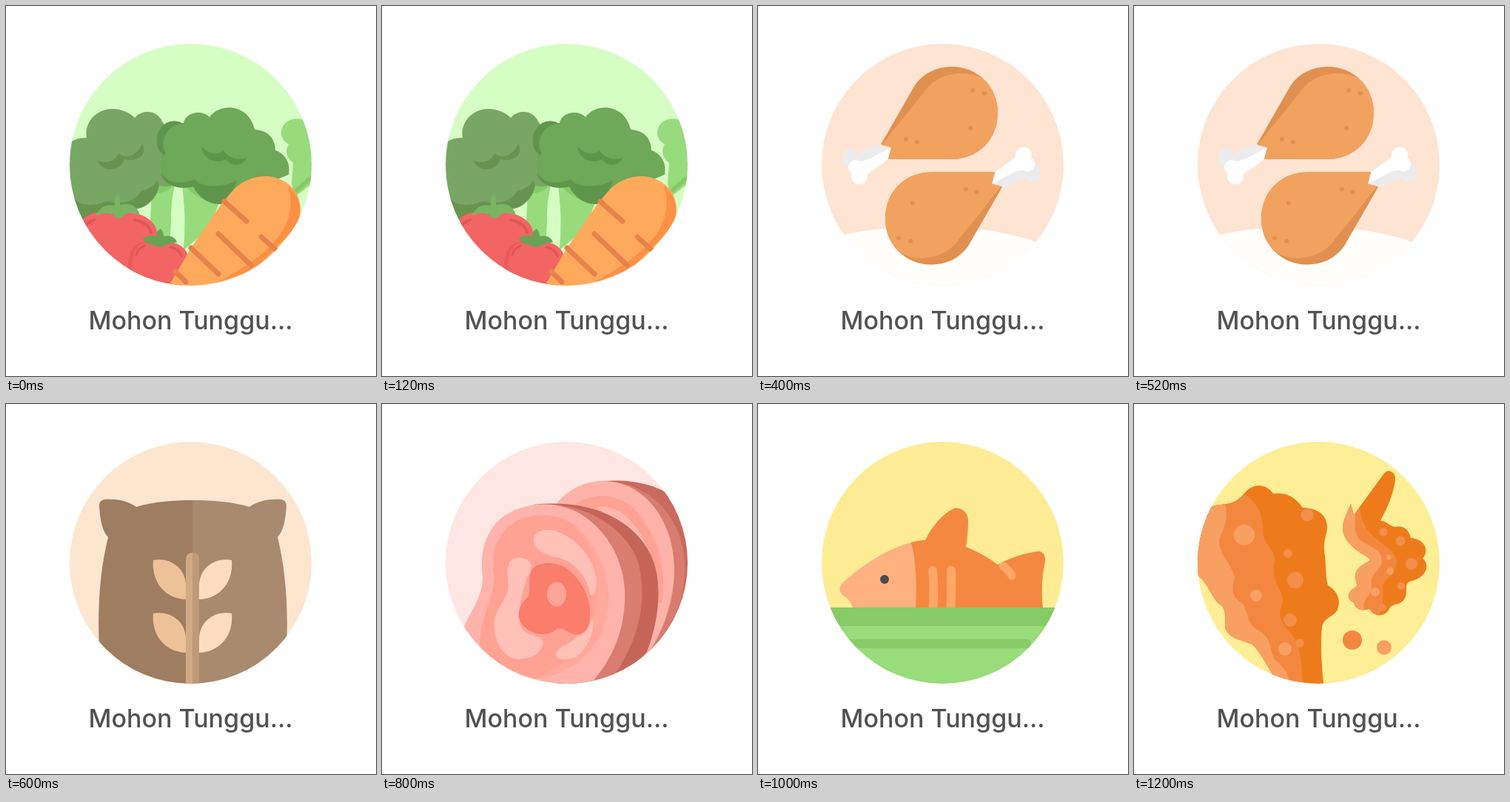
Write an HTML page that moves like this. It is 500 px wide and 500 px high and loops after 1400 ms.

```html
<!DOCTYPE html>
<html lang="id">
<head>
<meta charset="utf-8">
<title>Mohon Tunggu</title>
<style>
html, body { margin: 0; height: 100%; overflow: hidden; background: #fff; }
svg { display: block; width: 100vw; height: 100vh; }
text { font: 500 34px Inter, Roboto, sans-serif; fill: #515254; text-anchor: middle; }
.scene { display: none; }
.scene.on { display: inline; }
.line { fill: none; stroke-linecap: round; }
</style>
</head>
<body>
<svg viewBox="0 0 500 500">
<defs>
  <clipPath id="disc"><circle cx="249.5" cy="214.5" r="163.5"/></clipPath>
  <path id="leg" d="M97 150C100 137 108 137 125 135C138 133 143 127 148 122C160 106 178 107 188 121C205 120 215 123 228 140C245 141 260 147 261 165C261 180 254 185 258 205C260 225 259 235 262 245C275 253 280 265 275 278C270 288 256 288 254 302C252 325 253 350 257 385H200C185 365 175 340 160 325C145 318 128 318 123 302C123 290 125 280 118 272C105 265 100 240 86 232L80 200Z"/>
  <path id="wing" d="M293 135L297 150L337 95C342 87 352 90 353 100C352 120 341 143 333 158C341 157 345 166 354 166C366 163 372 172 374 181C390 182 401 196 390 209C401 217 395 236 372 240C365 244 370 252 367 260C361 274 352 268 346 275C341 287 326 290 318 277C309 280 299 278 297 268C288 265 287 254 299 248C304 245 299 241 299 233C299 222 309 217 318 212C321 207 304 202 298 195C283 182 277 170 287 149Z"/>
  <clipPath id="inLeg"><use href="#leg"/></clipPath>
  <clipPath id="inWing"><use href="#wing"/></clipPath>
  <g id="drum">
    <g fill="#ececec"><circle cx="124" cy="202" r="9.5"/><circle cx="123" cy="210" r="8"/><path d="M126 203L163 187L180 191L150 212L128 218Z"/></g>
    <g fill="#fff"><circle cx="132" cy="218" r="10"/><circle cx="137" cy="230" r="11"/><path d="M127 210Q142 211 152 206L180 191L176 207L148 227L132 226Z"/></g>
    <path fill="#e09050" d="M166 187L212 107C224 90 242 82 262 82C297 82 324 109 324 144C324 181 297 207 262 207H176L180 191Z"/>
    <path fill="#f2a25f" d="M167 188L224 117C235 100 255 90 280 91C297 93 308 99 312 107C320 117 324 130 324 144C324 181 297 207 262 207H176L180 191Z"/>
    <g fill="#e09050"><circle cx="290" cy="114" r="3"/><circle cx="306" cy="118" r="3"/><circle cx="287" cy="165" r="3"/><circle cx="200" cy="180" r="3"/><circle cx="215" cy="184" r="3"/></g>
  </g>
  <path id="half" d="M253 130C225 130 200 132 176 139C165 131 150 128 133 129C128 130 126 133 126 138C127 155 130 172 138 180C128 220 123 270 126 330V400H253Z"/>
  <path id="grain" d="M199 211C220 207 243 220 243 246V264C220 264 196 245 199 211Z"/>
</defs>

<g clip-path="url(#disc)">
<!-- vegetables -->
<g class="scene">
  <path fill="#d6fdc4" d="M80 45H420V385H80Z"/>
  <path fill="#98db7d" d="M420 160L402 154C385 149 371 158 372 173C373 180 377 184 382 187C376 196 380 207 388 212L386 240L390 258L420 235Z"/>
  <path class="line" stroke="#84cb68" stroke-width="6" d="M388 253L415 230"/>
  <path fill="#98db7d" d="M198 240L193 320H221C225 295 220 270 229 240ZM238 240C241 270 243 290 240 330L275 300L294 250Z"/>
  <path fill="#84cb68" d="M200 240L199 254Q218 253 228 240ZM241 240Q250 258 285 268L294 250Z"/>
  <path fill="#78a664" d="M80 190Q90 178 109 178C105 156 124 139 143 139C157 139 168 145 174 151C186 138 205 142 211 156L235 190V235C222 246 214 245 205 242C203 262 187 276 170 274C150 290 115 285 100 290L80 260Z"/>
  <path fill="#66944f" d="M86 254C103 278 128 266 137 264C157 270 178 262 182 250C192 248 202 242 205 235L207 243C203 262 187 276 170 274C150 290 115 285 100 290ZM124 209C138 214 148 209 152 199C158 205 175 207 184 186C192 201 178 211 160 207C155 224 130 226 124 209Z"/>
  <path fill="#5f954b" d="M245 162C222 146 205 162 204 180C203 192 208 197 212 200C205 225 215 245 240 245Z"/>
  <path fill="#6ea858" d="M216 199C207 185 216 160 240 158C242 146 262 138 275 150C290 130 328 132 336 167C355 168 364 180 364 195C378 200 385 213 382 228L340 245C310 272 272 275 253 244C240 248 212 242 209 220C208 210 211 203 216 199Z"/>
  <path fill="#5f954b" d="M209 226C222 243 243 240 255 234C265 246 290 246 312 236L300 266C280 272 262 262 253 244C240 248 215 246 209 226ZM264 190C276 202 289 201 294 195C301 207 316 209 326 205C318 218 304 217 297 207C285 214 266 208 264 190Z"/>
  <path fill="#f36464" d="M100 292C115 275 130 278 150 279C175 276 205 285 205 312V390H80Z"/>
  <path class="line" stroke="#dc5855" stroke-width="4" d="M174 289Q193 293 196 306M119 289Q110 292 106 300"/>
  <path fill="#78b461" d="M121 283C130 268 140 268 147 270C146 262 149 256 151 254C154 257 155 265 154 269C165 265 177 268 181 283C172 278 165 279 160 282C156 288 150 289 147 284C140 278 130 280 121 283Z"/>
  <path fill="#e95b5b" d="M160 390L166 342C168 322 182 316 205 319C228 316 246 325 246 342L235 390Z"/>
  <path fill="#f36464" d="M166 390L171 342C173 324 184 317 205 319C228 316 246 325 246 342L235 390Z"/>
  <path class="line" stroke="#dc5855" stroke-width="3" d="M222 326Q234 328 237 338M187 324Q178 328 176 336"/>
  <path fill="#6aa354" d="M185 315C190 309 198 310 203 311C203 306 206 302 209 301C212 304 213 308 213 311C222 309 230 313 231 320C224 319 220 322 216 323Q208 329 200 323C194 323 189 320 185 315Z"/>
  <path fill="#ffa95d" d="M216 385L250 327L290 269L305 251C318 236 340 227 360 231C390 237 402 262 397 285C393 300 375 318 350 345C325 365 290 378 250 390Z"/>
  <path fill="#fd9044" d="M381 243C400 258 402 285 388 302L335 357L285 374C340 345 400 305 381 243Z"/>
  <path class="line" stroke="#e8824b" stroke-width="7" d="M295 264L325 291M287 308L331 350M345 312L366 331M250 327L287 362M229 359L243 373"/>
</g>

<!-- fruit -->
<g class="scene">
  <path fill="#cffdbb" d="M80 45H420V385H80Z"/>
  <path fill="#78a664" d="M190 220L205 141C216 128 231 123 247 123C280 124 300 150 301 195V220Z"/>
  <path fill="#98da7c" d="M84 262C98 235 108 215 111 185C114 145 135 123 163 123C190 124 215 150 219 195V390H80Z"/>
  <path fill="#feeca2" d="M100 305C94 262 118 235 124 195C128 160 143 142 164 142C190 143 204 165 205 195V390H120Z"/>
  <path fill="#fdd985" d="M118 315Q132 328 150 330V345Z"/>
  <path fill="#f46666" d="M147 345C135 315 132 300 132 280C132 230 160 197 200 195C225 194 235 202 258 202C285 196 300 194 315 195C355 198 387 235 387 285C387 298 385 308 378 322L330 390H180Z"/>
  <path fill="#e95d5d" d="M147 345C135 315 132 300 132 280C132 230 160 197 200 195C218 194 230 199 242 201C205 215 188 260 191 310C194 340 202 360 218 378L150 390ZM258 202L292 196Q262 203 266 221H258Z"/>
  <path fill="#ff8d80" d="M229 221H290Q282 227 266 227H252Q236 227 229 221Z"/>
  <path fill="#aef06c" d="M271 168C283 140 300 123 330 123C350 123 370 130 392 129C385 160 370 192 335 195C310 196 290 180 271 168Z"/>
  <path fill="#a0e063" d="M271 168C283 140 300 123 330 123C350 123 370 130 392 129C365 158 320 150 271 168Z"/>
  <path fill="none" stroke="#9f7060" stroke-width="11" d="M252.500 228C252 205 248 185 236 162M251 190Q258 174 270 160"/>
  <g fill="#9f7060"><circle cx="236" cy="162" r="5.500"/><circle cx="270" cy="160" r="5.500"/></g>
  <ellipse fill="#ff8d80" cx="341" cy="263" rx="16" ry="25.500" transform="rotate(-5 341 263)"/>
</g>

<!-- drumsticks -->
<g class="scene">
  <path fill="#fee4d2" d="M80 45H420V385H80Z"/>
  <path fill="#fffefb" d="M100 313C180 292 300 290 385 322V400H90Z"/>
  <use href="#drum"/>
  <use href="#drum" transform="rotate(180 248 215.800)"/>
</g>

<!-- rice sack -->
<g class="scene">
  <path fill="#fde6d0" d="M80 45H420V385H80Z"/>
  <use href="#half" fill="#9e7d60"/>
  <use href="#half" fill="#a98a6e" transform="matrix(-1 0 0 1 505 0)"/>
  <g id="pair">
    <use href="#grain" fill="#edc298"/>
    <use href="#grain" fill="#ffdcbf" transform="matrix(-1 0 0 1 504 0)"/>
  </g>
  <use href="#pair" y="72"/>
  <path fill="#d1ab86" d="M243 390V210Q243 201 252 201V390Z"/>
  <path fill="#bf9a77" d="M261 390V210Q261 201 252 201V390Z"/>
</g>

<!-- sliced meat -->
<g class="scene">
  <path fill="#fee6e2" d="M80 45H420V385H80Z"/>
  <path fill="#c86a5e" d="M300 104C340 101 370 110 388 122L425 180V260L360 370L300 300Z"/>
  <path fill="#d97c70" d="M290 105C345 100 390 135 404 185C420 240 400 300 350 360L300 300Z"/>
  <path fill="#ffb2a8" d="M234 137C262 100 310 95 345 118C380 142 396 185 395 230C393 275 375 320 350 350L300 300Z"/>
  <path fill="#ffa294" d="M256 139C290 113 330 122 352 155C375 190 385 225 378 270L365 265L300 150Z"/>
  <path fill="#ffb8ae" d="M290 139C325 135 350 165 368 218L355 215L320 165Z"/>
  <path fill="#c5655a" d="M205 136C280 128 345 155 367 213C378 245 375 290 358 335L310 385H230Z"/>
  <path fill="#d97d71" d="M205 136C270 130 328 165 346 213C361 270 345 330 300 385H230Z"/>
  <path fill="#ffb3aa" d="M105 315C118 280 135 265 136 235C132 205 138 175 160 155C185 135 225 128 262 145C300 165 325 205 328 250C330 300 315 345 275 385L180 390Z"/>
  <path fill="#ffa294" d="M133 330C128 300 150 265 152 235C146 205 155 175 178 160C205 145 240 148 262 165C290 190 305 225 306 260C306 310 280 355 215 371C180 372 150 350 133 330Z"/>
  <path fill="#ffb3aa" d="M246 154C280 180 292 215 290 255C287 310 262 348 205 372Q240 373 270 352C300 325 308 290 305 250C300 205 275 170 246 154Z" opacity=".35"/>
  <g fill="#ffc0b7">
    <path d="M172 215C176 207 190 205 198 212C205 218 200 228 196 235C190 255 182 280 187 300C195 315 210 310 217 320C218 335 205 344 185 345C165 345 150 320 152 295C153 275 170 265 171 245C170 235 168 225 172 215Z"/>
    <path d="M206 178C212 168 230 168 243 175C265 185 288 210 290 240C290 255 285 262 281 257C278 235 262 215 240 208C220 205 200 195 206 178Z"/>
    <path d="M283 290C290 300 280 330 262 342C245 348 232 345 236 335C240 327 255 325 262 315C275 312 282 300 283 290Z"/>
  </g>
  <path fill="#fb7d6b" d="M203 223C215 212 235 212 252 224C270 238 284 265 281 290C280 305 270 314 258 311C245 305 240 300 232 307C222 315 195 312 186 292C182 280 188 268 198 260C202 250 196 235 203 223Z"/>
  <ellipse fill="#ffa597" cx="236" cy="257" rx="13" ry="16.500"/>
</g>

<!-- fish -->
<g class="scene">
  <path fill="#feec95" d="M80 45H420V385H80Z"/>
  <path fill="#f48840" d="M206 187C214 185 220 184 226 184C235 165 250 148 265 141C275 139 283 146 284 156C284 170 283 182 281 193C298 200 312 208 324 217C340 208 360 201 380 199C386 200 389 206 388 213C383 235 383 255 385 276H213Z"/>
  <path fill="#ffb180" d="M207 187C170 197 135 222 113 243C109 248 110 254 114 258Q125 264 128 276H213C215 240 213 210 207 187Z"/>
  <circle fill="#4b4b4d" cx="171" cy="237" r="6"/>
  <path class="line" stroke="#ffa766" stroke-width="12" d="M236 225Q239 250 236 282M261 225Q262 250 260 282"/>
  <path class="line" stroke="#ffa766" stroke-width="11" d="M331 219Q339 224 343 232"/>
  <path fill="#98dc7c" d="M80 275H420V385H80Z"/>
  <path fill="#86cb66" d="M80 275H420V300H80ZM80 318H363A6 6 0 0 1 363 330H80Z"/>
</g>

<!-- fried chicken -->
<g class="scene">
  <path fill="#feee96" d="M80 45H420V385H80Z"/>
  <use href="#leg" fill="#ee7b1b"/>
  <g clip-path="url(#inLeg)">
    <path fill="#f38740" d="M146 120C172 135 174 155 175 178C178 192 192 198 190 215C184 240 202 250 201 268C194 285 198 295 210 308C228 325 225 355 230 390H70V100Z"/>
    <path fill="#f8a062" d="M122 130C130 160 118 170 115 185C115 205 135 220 136 235C128 260 140 265 147 270C156 285 150 292 166 305C186 314 182 330 190 345C200 355 211 362 213 390H70V100Z"/>
  </g>
  <g fill="#f8a062"><circle cx="149" cy="177" r="14"/><circle cx="165" cy="259" r="8"/><circle cx="204" cy="331" r="9"/></g>
  <g fill="#f38f4b"><circle cx="234" cy="150" r="8.500"/><circle cx="208" cy="202" r="6"/><circle cx="218" cy="238" r="11"/><circle cx="211" cy="292" r="9"/><circle cx="224" cy="323" r="6"/></g>
  <use href="#wing" fill="#ee7b1b"/>
  <g clip-path="url(#inWing)">
    <path fill="#f38740" d="M305 130C304 165 320 178 345 196C362 210 354 226 340 238C330 250 345 265 328 290H275V130Z"/>
    <path fill="#f8a062" d="M297 130C304 150 292 165 304 182C316 194 335 193 335 213C333 225 318 230 321 245C323 260 305 262 312 282H275V130Z"/>
  </g>
  <g fill="#f38f4b"><circle cx="337" cy="173" r="5.500"/><circle cx="360" cy="185" r="6.500"/><circle cx="375" cy="216" r="8"/><circle cx="361" cy="246" r="5"/><circle cx="336" cy="275" r="5"/></g>
  <g fill="#f8a062"><circle cx="344" cy="207" r="3.500"/><circle cx="346" cy="226" r="5"/><circle cx="326" cy="254" r="6"/></g>
  <circle fill="#f38740" cx="295" cy="319" r="13"/>
  <circle fill="#f8a062" cx="338" cy="329" r="10"/>
</g>
</g>
<text x="249.500" y="437">Mohon Tunggu...</text>
</svg>
<script>
const scenes = [...document.querySelectorAll('.scene')];
const HOLD = 200;
const start = performance.now();

function draw() {
  const now = Math.floor((performance.now() - start) / HOLD) % scenes.length;
  scenes.forEach((scene, i) => scene.classList.toggle('on', i === now));
  requestAnimationFrame(draw);
}
draw();
</script>
</body>
</html>
```
